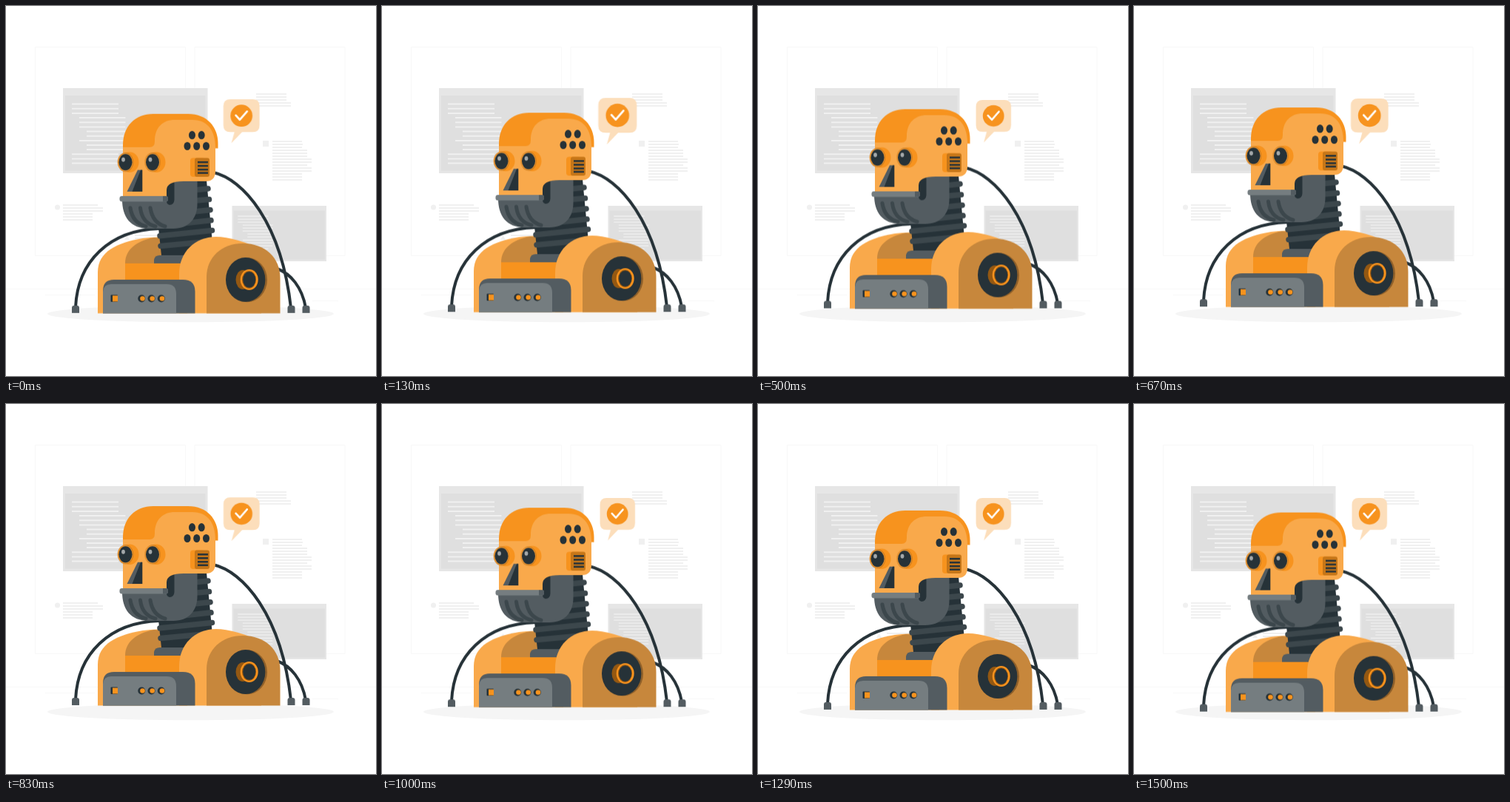
Recreate the animation shown at these times as an HTML page without scripts. Size 500 by 500 pixels, loop 1540 ms.

```html
<!DOCTYPE html>
<html lang="en">
<head>
<meta charset="utf-8">
<title>Robot assistant</title>
<style>
  html, body { margin: 0; width: 100%; height: 100%; overflow: hidden; background: #fff; }
  svg { display: block; width: 100vw; height: 100vh; }

  .orange { fill: #f7931e; }
  .light { fill: #f9a94b; }
  .shade { fill: #c7873c; }
  .rust { fill: #c67618; }
  .dark { fill: #263238; }
  .steel { fill: #535c61; }
  .pale { fill: #757d80; }
  .wire, .vents { fill: none; stroke: #263238; }
  .wire { stroke-width: 4; stroke-linecap: round; }
  .vents { stroke-width: 2.4; }
  .ribs { fill: none; stroke: #3c474c; stroke-width: 7.5; stroke-linecap: round; }
  .faint { fill: none; stroke: #f8f8f8; }
  .text { fill: none; stroke: #f0f0f0; stroke-width: 2; }

  #robot { animation: float 1540ms linear infinite; }
  #bubble { transform-origin: 318px 156px; animation: beat 1540ms linear infinite; }

  @keyframes float {
    0%, 100% { transform: translateY(0); }
    46.6% { transform: translateY(-9.4px); }
    97.4% { transform: translateY(.6px); }
  }
  @keyframes beat {
    0%, 100% { transform: scale(1.02); }
    7.5%, 46.75% { transform: scale(1.1); }
    27.6%, 37%, 56.5%, 97.4% { transform: scale(1); }
  }
</style>
</head>
<body>
<svg viewBox="0 0 500 500">
  <defs>
    <g id="window">
      <path fill="#e6e6e6" d="M0 0H195.5V115H0Z"/>
      <path fill="#dfdfdf" d="M3 10H192.5V111.5H3Z"/>
      <path class="text" stroke-width="2.6" d="M12 21.5h63m-63 6.2h63m-63 6.2h63M22 40h62.500m-62.500 6.200h62.500m-62.500 6.200h62.500M32 58.500h52m-52 6.200h52M22 71h62.500M32 77h52m-52 6h52M12 89.200h63m-63 6.200h63m-63 6.200h63"/>
    </g>
    <g id="eye">
      <ellipse class="rust" rx="10.7" ry="13"/>
      <ellipse class="light" cx="-.5" rx="10.500" ry="12.500" opacity=".5"/>
      <ellipse class="dark" rx="9" ry="11"/>
      <ellipse fill="#a3a8aa" cx="-3" cy="-3.500" rx="2.400" ry="3"/>
    </g>
    <g id="led">
      <circle class="dark" r="5"/>
      <circle class="orange" cx="1.200" r="3.300"/>
    </g>
    <ellipse id="hole" class="dark" rx="4.500" ry="5.600"/>
    <path id="plug" class="steel" d="M-5 10V3Q-5 0-2 0H2Q5 0 5 3V10Z"/>
  </defs>

  <!-- Background -->
  <path class="faint" d="M39.500 55.500H242.500V337.500H39.500ZM255 55.500H458V337.500H255Z"/>
  <path class="faint" stroke="#f0f0f0" d="M0 382.500H500M53 390.500H120M414 398.500H449"/>
  <use href="#window" x="77" y="111"/>
  <use href="#window" transform="translate(305.500 270) scale(.652)"/>
  <path class="text" d="M338 119h41m-41 4h41m-41 4h41m-41 4h47m-47 4h47"/>
  <path class="text" d="M360 183h40m-40 4h41m-41 4h40m-40 4h47m-47 4h47m-47 4h47m-47 4h53m-53 4h53m-53 4h47m-47 4h53m-53 4h53m-53 4h40m-40 4h40m-40 4h40"/>
  <path class="text" d="M77 269h47m-47 4h54m-54 4h54m-54 4h40m-40 4h40m-40 4h40M174 310h46m-46 4h46m-46 4h46"/>
  <path fill="#f0f0f0" d="M347 182h8v8h-8ZM160 316l3.500-6 3.500 6Z"/>
  <circle fill="#f0f0f0" cx="69.500" cy="272" r="3.500"/>
  <ellipse fill="#f5f5f5" cx="249.500" cy="416" rx="193.500" ry="11.300"/>

  <g id="robot">
    <path class="wire" d="M94 407C97 345 140 303 207 301M280 225C320 234 372 292 385 408M366 355C385 362 400 380 405 408"/>
    <use href="#plug" x="94" y="405"/>
    <use href="#plug" x="385.500" y="405"/>
    <use href="#plug" x="405.500" y="405"/>

    <!-- Torso -->
    <path class="light" d="M124 415.400V360C124 332 150 320 185 314C205 311 225 312 245 320V415.400Z"/>
    <path class="shade" d="M161 348C161 330 175 318 200 313L250 318V348Z"/>
    <path class="orange" d="M161 348H245V415H161Z"/>
    <path class="steel" d="M200 348V343Q201 337 208 337H250V348Z"/>

    <!-- Neck -->
    <path class="dark" d="M225 236H271L279 320L240 337H210L206 300Z"/>
    <path class="ribs" d="M240 250.500L273 247M235 265L274.500 261.500M225 281L276 275.700M212 297L277 289.800M208 310.800L278.500 303.500M209 324.500L278 318"/>

    <!-- Shoulder -->
    <path class="light" d="M234 415.400V362C234 333 255 312 284 312C300 312 325 319 345 329V415.400Z"/>
    <path class="shade" d="M271 415.400V367C271 339 292 321 320 321C350 321 370.500 340 370.500 368V415.400Z"/>
    <ellipse fill="#8f602a" cx="326" cy="370.300" rx="27" ry="30"/>
    <ellipse class="dark" cx="323.700" cy="370" rx="26.700" ry="30"/>
    <ellipse fill="#945812" cx="320" cy="370" rx="9.500" ry="13"/>
    <ellipse class="orange" cx="328.700" cy="370" rx="12" ry="14"/>
    <ellipse fill="#945812" cx="328.500" cy="370" rx="9.500" ry="11.700"/>
    <ellipse class="dark" cx="328.700" cy="370" rx="8.500" ry="10.800"/>

    <!-- Chest panel -->
    <path class="steel" d="M131 415.400V385Q131 370 146 370H239Q255.500 370 255.500 386V415.400Z"/>
    <path class="pale" d="M131 415.400V386Q132 376 142 376H217Q230 376 230 389V415.400Z"/>
    <rect class="dark" x="141.500" y="390.500" width="9.500" height="9.500" rx="1"/>
    <path class="orange" d="M144 391.500h7v8h-7Z"/>
    <use href="#led" x="183.300" y="395.500"/>
    <use href="#led" x="196.500" y="395.500"/>
    <use href="#led" x="209.800" y="395.500"/>

    <!-- Jaw -->
    <path class="steel" d="M157 262C157 285 168 301 193 301H226C248 301 258.500 286 258.500 268V236H217V262Z"/>
    <path class="ribs" stroke-width="5" style="stroke-width:5" d="M168 273C170 286 177 295 189 298M181.500 273C183 286 190 295 202 298M195 273C197 286 204 295 215 298"/>
    <path class="dark" d="M217 246Q220 239 227.500 237V262Q227 269 221 269Q217 268 217 264Z"/>
    <rect class="pale" x="153.500" y="257" width="65.500" height="7.500" rx="3"/>
    <path class="steel" d="M212 257h4q3 0 3 3.700t-3 3.800h-4Z"/>

    <!-- Head -->
    <path class="orange" d="M158 192V188C158 163 174 146 199 146H246C272 146 286.500 164 286.500 186V192.500H158Z"/>
    <path class="light" d="M158 191H194Q201 191 201 183C201 164 212 154 228 154H252C272 154 283 168 283 192V223Q283 237 270 237H240Q217 237 217 249V257H158Z"/>
    <use href="#hole" x="251.500" y="174.700"/>
    <use href="#hole" x="264.200" y="174.700"/>
    <use href="#hole" x="245" y="189.500"/>
    <use href="#hole" x="257.700" y="189.500"/>
    <use href="#hole" x="270.500" y="189.500"/>

    <rect class="orange" x="249" y="205.500" width="20" height="25.500" rx="4"/>
    <rect class="rust" x="255" y="205.500" width="20" height="25.500" rx="3"/>
    <path class="vents" d="M259 211.200h14m-14 5h14m-14 5h14m-14 4.500h14"/>

    <ellipse class="orange" cx="167" cy="211.200" rx="12.500" ry="13.700"/>
    <ellipse class="orange" cx="203" cy="211.200" rx="12.500" ry="13.700"/>
    <use href="#eye" x="161.500" y="211.200"/>
    <use href="#eye" x="198" y="211.200"/>

    <path class="steel" d="M163.500 251L178 221.800H184L171 251Z"/>
    <path class="dark" d="M184.300 221.800V251H170.500L182 221.800Z"/>
  </g>

  <g id="bubble">
    <path fill="#fcdebb" d="M303.500 127H333Q342 127 342 136V161Q342 170 333 170H319L305 184.500L309 170H303.500Q294.500 170 294.500 161V136Q294.500 127 303.500 127Z"/>
    <circle class="orange" cx="318.200" cy="148.500" r="14.400"/>
    <path fill="none" stroke="#fff" stroke-width="2.600" stroke-linecap="round" stroke-linejoin="round" d="M310.800 148L316 153.700L325.500 142.800"/>
  </g>
</svg>
</body>
</html>
```
